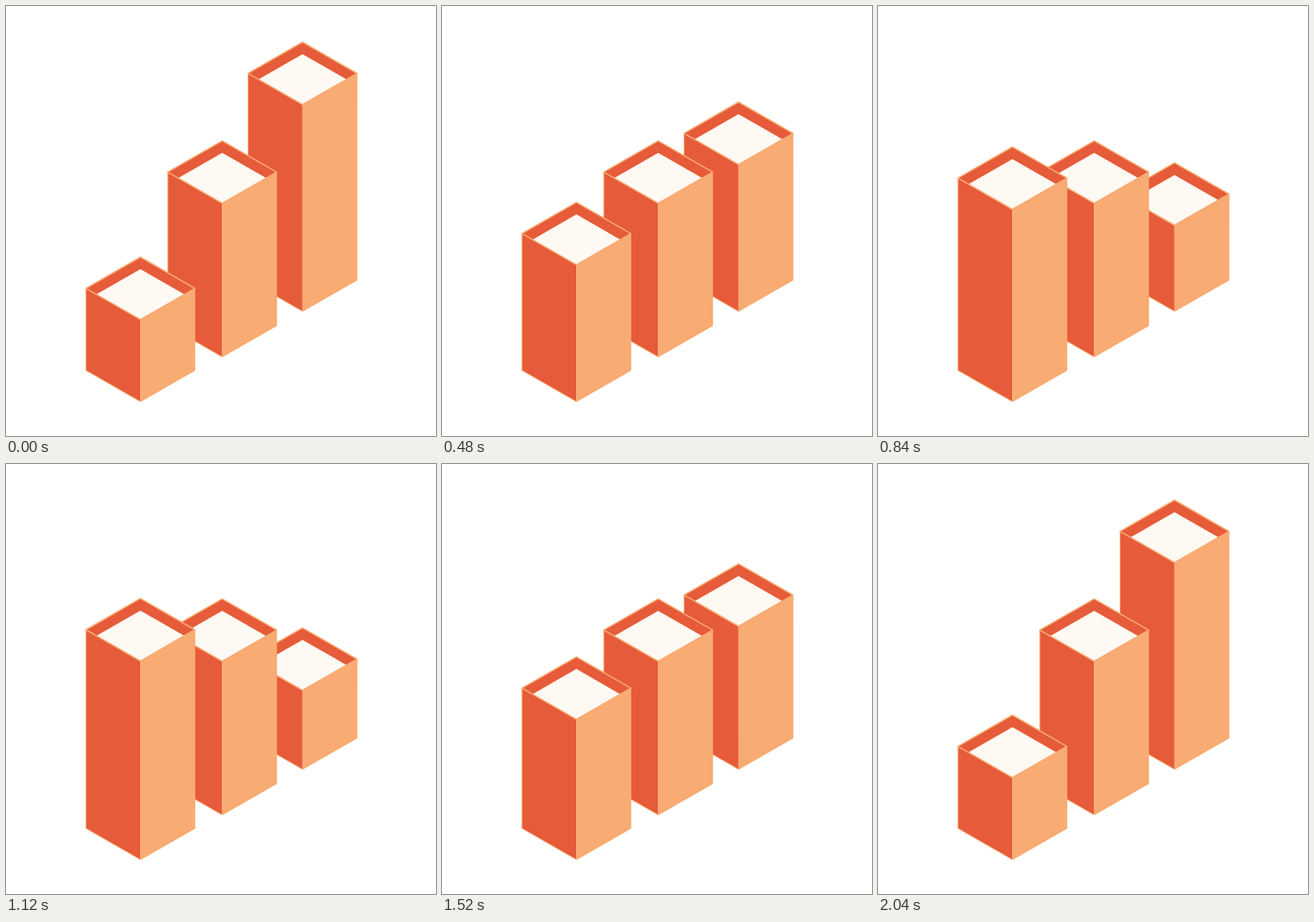
Animation, 500 px wide and 500 px high, one loop 2.68 s. Source, as an HTML page:

```html
<!DOCTYPE html>
<html lang="en">
<head>
<meta charset="utf-8">
<title>Bars</title>
<style>
html, body { margin: 0; width: 100%; height: 100%; overflow: hidden; background: #fff; }
svg { display: block; width: 100vw; height: 100vh; }
.left, .rim { fill: #e65b39; }
.right { fill: #f8ab72; }
.fill { fill: #fff9f3; }
.edge { fill: none; stroke: #f8ab72; stroke-width: 1.5; stroke-linejoin: round; }
.side { fill: none; stroke: #f8ab72; stroke-width: 1; }
</style>
</head>
<body>
<svg id="stage" viewBox="0 0 500 500"></svg>
<script>
const LOOP = 2680, STEP = 40, TURN = 1020, END = 2000;
const HW = 63.3, HH = 36.3, DEPTH = 14;
const SVG = "http://www.w3.org/2000/svg";
const stage = document.getElementById("stage");

// Back to front: centre x, top apex at rest, bottom vertex, travel
const bars = [
  { x: 344.8, top: 42, base: 355, travel: 153 },
  { x: 251.4, top: 156.8, base: 408, travel: 0 },
  { x: 156.3, top: 292, base: 460, travel: -139.6 }
];

const points = list => list.map(p => p.join()).join(" ");

function add(bar, tag, name) {
  const el = document.createElementNS(SVG, tag);
  el.setAttribute("class", name);
  stage.append(el);
  bar[name] = el;
}

for (const bar of bars) {
  for (const name of ["left", "right", "rim", "fill", "edge"]) add(bar, "polygon", name);
  add(bar, "polyline", "side");
}

function draw(bar, top) {
  const { x, base } = bar;
  const l = x - HW, r = x + HW;
  const mid = top + HH, front = top + 2 * HH, foot = base - HH;
  const set = (name, list) => bar[name].setAttribute("points", points(list));
  const rhombus = [[x, top], [r, mid], [x, front], [l, mid]];

  // Sunken surface, hidden below the front edges
  const w = HW * (1 - DEPTH / (2 * HH));
  const y = mid + DEPTH / 2;

  set("left", [[l, mid], [x, front], [x, base], [l, foot]]);
  set("right", [[r, mid], [x, front], [x, base], [r, foot]]);
  set("rim", rhombus);
  set("fill", [[x, top + DEPTH], [x + w, y], [x, front], [x - w, y]]);
  set("edge", rhombus);
  set("side", [[l, mid], [l, foot], [x, base], [r, foot], [r, mid]]);
}

const smooth = t => t * t * (3 - 2 * t);

function swing(t) {
  if (t < TURN) return smooth(t / TURN);
  return t < END ? 1 - smooth((t - TURN) / (END - TURN)) : 0;
}

const start = performance.now();

function frame(now) {
  const t = Math.max(0, now - start) % LOOP;
  const p = swing(Math.floor(t / STEP) * STEP);
  for (const bar of bars) draw(bar, bar.top + bar.travel * p);
  requestAnimationFrame(frame);
}
frame(start);
</script>
</body>
</html>
```
